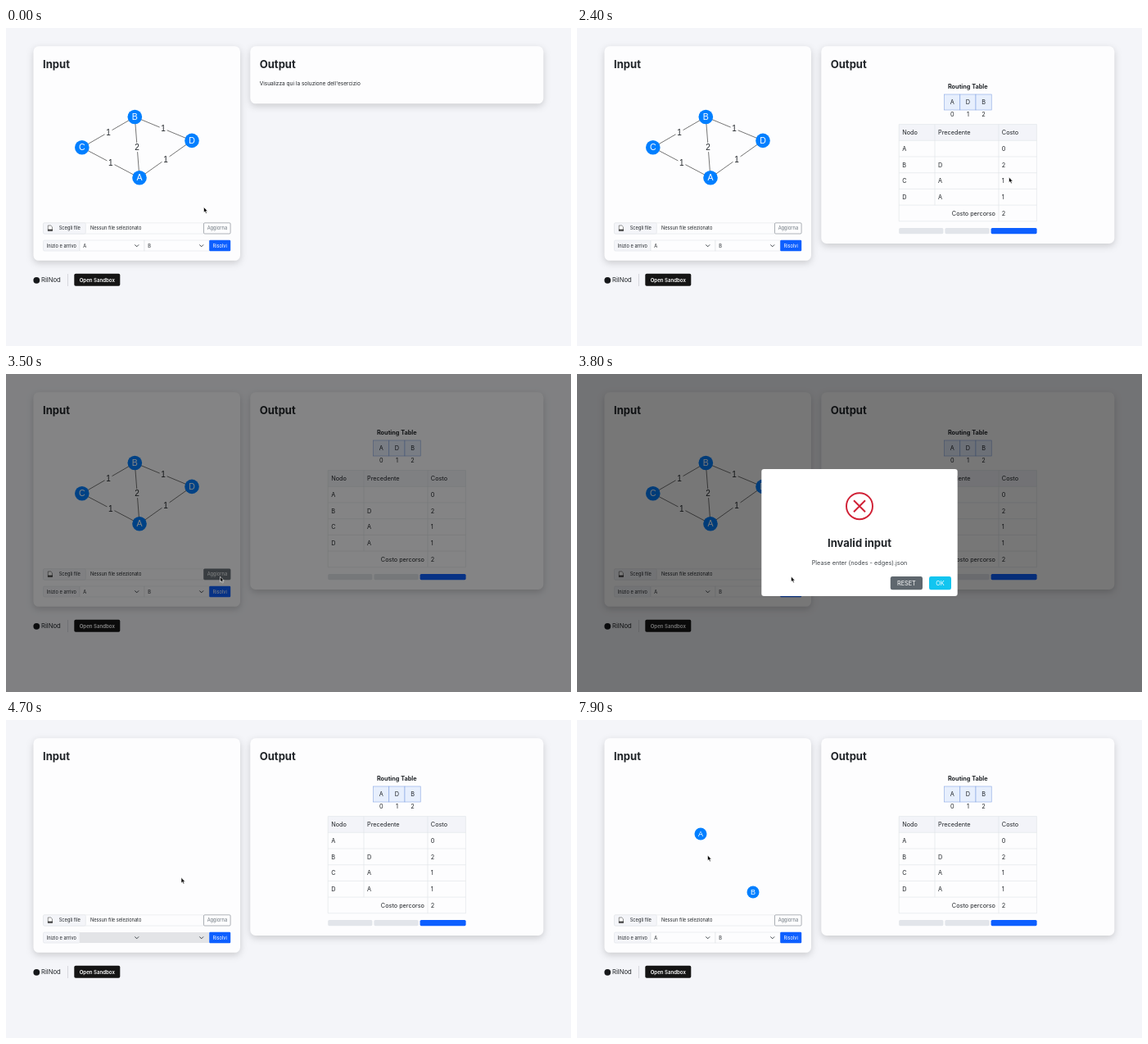
An HTML page that plays this animation: 690 by 388 pixels, repeating every 8000 ms.

```html
<!DOCTYPE html>
<html lang="it">
<head>
<meta charset="utf-8">
<title>Routing</title>
<style>
html, body { margin: 0; width: 100%; height: 100%; overflow: hidden; background: #f4f5f9; }
svg { display: block; width: 690px; height: 388px; font-family: Inter, "Liberation Sans", sans-serif; }
.card { fill: #fdfdfe; filter: drop-shadow(0 3px 4px rgba(0, 0, 0, .17)); }
.net { font-family: "Liberation Sans", Arial, sans-serif; }
</style>
</head>
<body>
<svg id="stage" viewBox="0 0 690 388"></svg>
<script>
const LOOP = 8000, FRAME = 100;
const INK = '#212529', BLUE = '#0d5fff', NODE = '#007fff', LINE = '#dee2e6', PALE = '#f4f5f9';
const SMALL = 5.69, BODY = 6.53, TABLE = 7.3, TITLE = 13.05;

// Pointer path: time, x, y of the tip
const PATH = [
  [0, 241.5, 218.5], [400, 262, 268], [800, 262, 268], [1100, 434, 183], [1200, 434, 183],
  [2000, 533, 184], [2100, 527.5, 182], [2600, 527.5, 182], [3200, 261.5, 247.3], [3800, 261.5, 247],
  [4200, 405, 254], [4400, 409, 257.5], [4500, 409, 257.5], [4700, 214, 192.3], [5100, 143, 136],
  [5600, 143, 136], [6400, 213, 114], [6700, 213, 114], [7500, 215, 210], [7900, 159.5, 165]
];
const HAND = [[300, 900], [3100, 3400], [4100, 4600]];

const ramp = (t, from, to) => Math.min(1, Math.max(0, (t - from) / (to - from)));
const easeOut = p => 1 - (1 - p) ** 2;
const smooth = p => p * p * (3 - 2 * p);
const within = (t, a, b) => t >= a && t < b;

function pointerAt(t) {
  const i = PATH.findIndex(k => k[0] > t);
  if (i < 0) return PATH[PATH.length - 1].slice(1);
  const [t0, x0, y0] = PATH[i - 1], [t1, x1, y1] = PATH[i];
  const p = smooth(ramp(t, t0, t1));
  return [x0 + (x1 - x0) * p, y0 + (y1 - y0) * p];
}

const text = (s, x, y, size, { fill = INK, weight = 400, anchor = 'start' } = {}) =>
  `<text x="${x}" y="${y}" font-size="${size}" fill="${fill}" font-weight="${weight}" text-anchor="${anchor}">${s}</text>`;
const rect = (x, y, w, h, fill, more = '') =>
  `<rect x="${x}" y="${y}" width="${w}" height="${h}" fill="${fill}" ${more}/>`;
const path = (d, stroke, width, fill = 'none') =>
  `<path d="${d}" stroke="${stroke}" stroke-width="${width}" fill="${fill}" stroke-linejoin="round"/>`;
const card = (x, w, h) => `<rect class="card" x="${x}" y="22.3" width="${w}" height="${h}" rx="6.5"/>`;
const border = (color = LINE) => `stroke="${color}" stroke-width=".55"`;
const mid = { anchor: 'middle' };

function node(name, x, y, r = 8.8) {
  return `<circle cx="${x}" cy="${y}" r="${r}" fill="${NODE}"/>` +
    text(name, x, y + r * .4, r * 1.2, { fill: '#fff', ...mid });
}

function network() {
  const at = { A: [163, 182.8], B: [157.3, 108.5], C: [92.8, 145.8], D: [227, 137.4] };
  const edges = ['CB1', 'BD1', 'AB2', 'CA1', 'AD1'].map(([from, to, cost]) => {
    const [x1, y1] = at[from], [x2, y2] = at[to], x = (x1 + x2) / 2, y = (y1 + y2) / 2;
    return path(`M${x1} ${y1}L${x2} ${y2}`, '#666', .9) + rect(x - 4.5, y - 5.5, 9, 11, '#fdfdfe') +
      text(cost, x, y + 3.5, 10, mid);
  });
  return edges.join('') + Object.entries(at).map(([n, [x, y]]) => node(n, x, y)).join('');
}

function drawnNodes(t) {
  let out = '';
  if (within(t, 5400, 5700)) out += '<circle cx="143" cy="136" r="6.5" fill="#000" opacity=".15"/>';
  if (t >= 5700) out += node('A', 151, 139, 7.5);
  if (t >= 6700) out += node('B', ...pointerAt(Math.min(t, 7500)), 7.5);
  return out;
}

function inputCard(t) {
  const cleared = t >= 4400, empty = cleared && t < 5700, hover = within(t, 3100, 4400);
  const second = within(t, 5700, 6700) ? 'A' : 'B';
  const select = (x, value) => rect(x, 259, 79, 13, empty ? '#e3e4e7' : '#fdfdfe', empty ? '' : border()) +
    (empty ? '' : text(value, x + 4.3, 267.6, SMALL)) +
    path(`M${x + 67.3} 264.4l2.4 2.4l2.4-2.4`, '#343a40', .95);
  return card(33.5, 252.5, 261.5) +
    text('Input', 45, 49, TITLE, { weight: 700 }) +
    `<g class="net">${cleared ? drawnNodes(t) : network()}</g>` +
    rect(45.5, 237.8, 196, 13.2, '#fdfdfe', border() + ' rx="1.5"') +
    rect(45.5, 237.8, 51.8, 13.2, PALE, border() + ' rx="1.5"') +
    path('M51.3 241h3.4l1.7 1.7v5h-5.1z', '#444', .6, '#fff') + rect(51, 245.7, 6, 1.7, '#333') +
    text('Scegli file', 64.7, 246.4, SMALL) +
    text('Nessun file selezionato', 103, 246.4, SMALL) +
    rect(241.5, 237.8, 32.6, 13.2, hover ? '#6c757d' : '#fdfdfe', border('#6c757d') + ' rx="1.2"') +
    text('Aggiorna', 257.9, 246.4, SMALL, { fill: hover ? '#fff' : '#6c757d', ...mid }) +
    rect(45.5, 259, 44.5, 13, PALE, border() + ' rx="1.5"') +
    text('Inizio e arrivo', 49.7, 267.6, SMALL) +
    select(90, 'A') + select(169, second) +
    rect(248.2, 258.8, 26, 13.4, BLUE, 'rx="1.2"') +
    text('Risolvi', 261.2, 267.6, SMALL, { fill: '#fff', ...mid });
}

function solution(step) {
  const route = 'ADB', left = 393.2, top = 117.6, rowH = 19.7, right = 561.4;
  let out = text('Routing Table', 477.3, 74, TABLE, { weight: 700, ...mid });
  for (let i = 0; i < 3; i++) {
    const x = 448.6 + i * 19.2;
    out += rect(x, 81, 19.2, 19, '#e7effd', border('#7f9fe0')) +
      (i <= step ? text(route[i], x + 9.6, 93.2, TABLE, mid) : '') +
      text(i, x + 9.6, 107.7, TABLE, mid);
  }
  const rows = [['Nodo', 'Precedente', 'Costo'], ['A', '', 0], ['B', step ? 'D' : 'A', 2], ['C', 'A', 1], ['D', 'A', 1]];
  out += rect(left, top, right - left, rowH, '#f3f4f9');
  rows.forEach((cells, r) => cells.forEach((s, c) =>
    out += text(s, [397.2, 441, 518.8][c], top + r * rowH + 12.5, TABLE)));
  out += text('Costo percorso', 511, 228.7, TABLE, { anchor: 'end' }) + text(step, 518.8, 228.7, TABLE);
  for (let r = 0; r < 7; r++) out += path(`M${left} ${top + r * rowH}H${right}`, LINE, .6);
  const bottom = top + 6 * rowH;
  out += path(`M${left} ${top}V${bottom}M437 ${top}V${bottom - rowH}M515 ${top}V${bottom}M${right} ${top}V${bottom}`, LINE, .6);
  for (let i = 0; i < 3; i++)
    out += rect(393.2 + i * 56.2, 244, i < 2 ? 54.2 : 56, 7.2, i === step ? BLUE : '#e2e5ea', 'rx="1.6"');
  return out;
}

function outputCard(t) {
  const solved = t >= 600, step = t < 1800 ? 0 : t < 2200 ? 1 : 2;
  return card(298.3, 358, solved ? 240.7 : 70) +
    text('Output', 309.7, 49, TITLE, { weight: 700 }) +
    (solved ? solution(step) : text('Visualizza qui la soluzione dell\'esercizio', 309.7, 70.2, BODY));
}

const footer = () =>
  '<circle cx="37.3" cy="307.8" r="3.9" fill="#16181b"/>' +
  text('RilNod', 43, 310.4, 7.7) +
  path('M75.5 300V315', '#c9ccd1', .7) +
  rect(83.3, 299.8, 56, 15, '#151515', 'rx="1.8"') +
  text('Open Sandbox', 111.3, 309.5, 6.1, { fill: '#fff', weight: 600, ...mid });

function dialog(t) {
  const shade = .53 * (ramp(t, 3365, 3515) - ramp(t, 4530, 4680));
  const alpha = ramp(t, 3520, 3670) - ramp(t, 4368, 4518);
  const lift = -20 * (1 - easeOut(ramp(t, 3520, 3820)) + easeOut(ramp(t, 4368, 4650)));
  if (shade <= 0) return '';
  const button = (s, x, w, fill) => rect(x, 247.2, w, 16.2, fill, 'rx="2.4"') +
    text(s, x + w / 2, 258, TABLE, { fill: '#fff', ...mid });
  return rect(0, 0, 690, 388, '#000', `opacity="${shade}"`) +
    `<g opacity="${alpha}" transform="translate(0 ${lift})">` +
    rect(225.3, 116, 239.4, 155, '#fff', 'rx="3.2"') +
    '<circle cx="345" cy="161.3" r="16" fill="none" stroke="#d02035" stroke-width="1.9"/>' +
    path('M338 154.3l14 14m0-14l-14 14', '#d02035', 1.9) +
    text('Invalid input', 345, 211.3, TITLE, { weight: 700, ...mid }) +
    text('Please enter (nodes - edges).json', 345, 232.6, TABLE, { fill: '#43484d', ...mid }) +
    button('RESET', 382.8, 39.2, '#5f676e') + button('OK', 430, 27, '#12c5f0') + '</g>';
}

function pointer(t) {
  const [x, y] = pointerAt(t);
  const shape = HAND.some(([a, b]) => within(t, a, b))
    ? path('M-.7 .6Q0-.6 .7 .6V3l2.6.7q.7.3.5 1.3L3.2 8H-.8L-2.6 5.3q-.2-1 .9-.7l1 .8z', '#111', .6, '#fff')
    : path('M0 0V6.6L1.5 5.3L2.6 7.7L3.8 7.2L2.7 4.9H4.7Z', '#fff', .6, '#000');
  return `<g transform="translate(${x} ${y})">${shape}</g>`;
}

const stage = document.getElementById('stage');
const start = performance.now();
let shown = -1;

function tick() {
  const t = Math.floor((performance.now() - start) % LOOP / FRAME) * FRAME;
  if (t !== shown) {
    shown = t;
    stage.innerHTML = inputCard(t) + outputCard(t) + footer() + dialog(t) + pointer(t);
  }
  requestAnimationFrame(tick);
}
tick();
</script>
</body>
</html>
```
